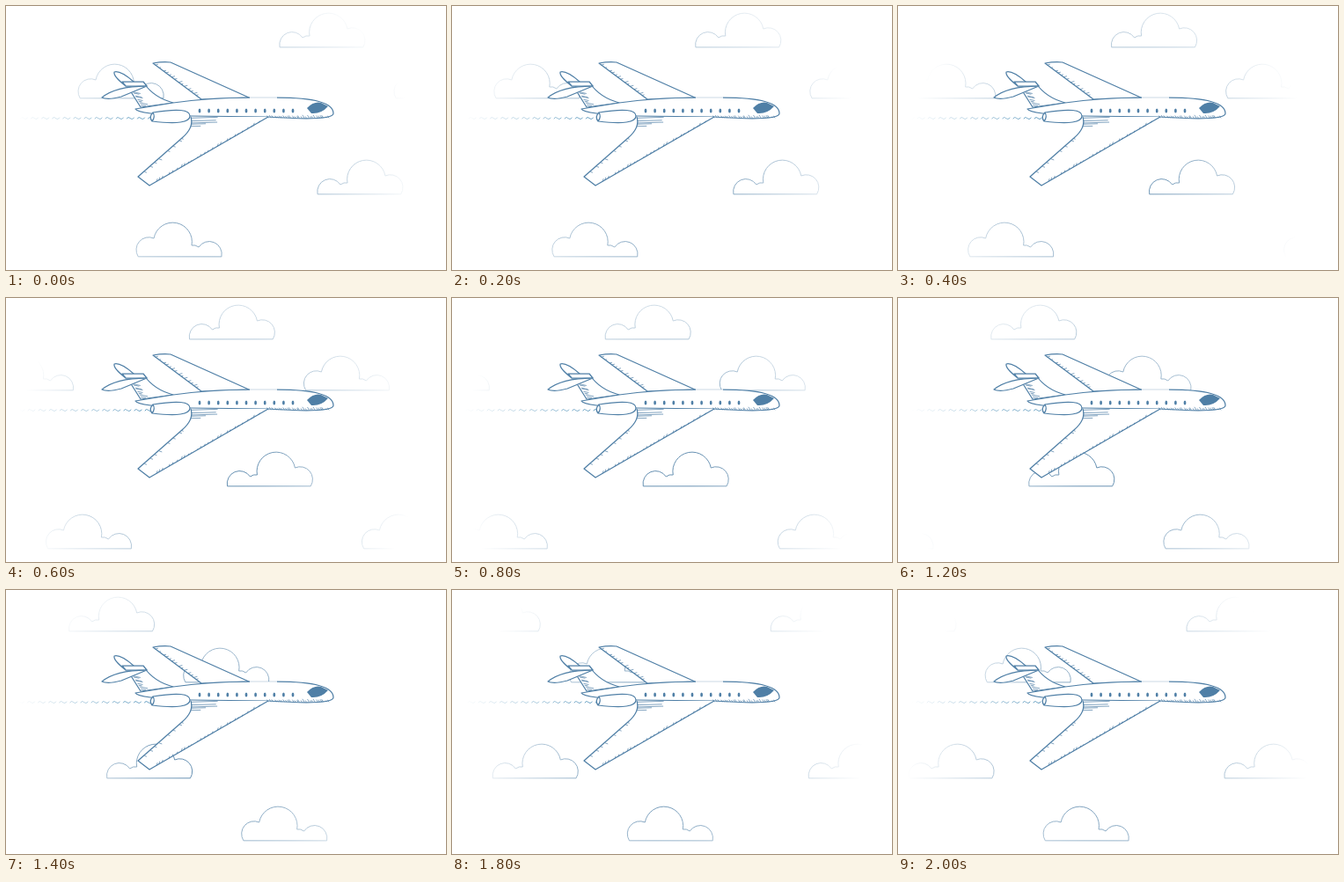
These frames come from a looping animation (500x300 px, 2.1 s). An HTML page:

```html
<!DOCTYPE html>
<html lang="en">
<head>
<meta charset="utf-8">
<title>Plane among clouds</title>
<style>
  html, body { margin: 0; width: 100%; height: 100%; overflow: hidden; background: #fff; }
  svg { display: block; width: 100vw; height: 100vh; }
  .line { fill: none; stroke: #4f7fa6; stroke-linecap: round; stroke-linejoin: round; }
  .solid { fill: #fff; stroke: #4f7fa6; stroke-width: 1.25; stroke-linejoin: round; }
  .ink { fill: #4f7fa6; }
</style>
</head>
<body>
<svg viewBox="0 0 500 300">
  <defs>
    <path id="cloud"/>
    <radialGradient id="haze" gradientUnits="userSpaceOnUse" cx="238" cy="181" r="229">
      <stop offset=".2" stop-color="#fff" stop-opacity=".1"/>
      <stop offset="1" stop-color="#fff"/>
    </radialGradient>
    <linearGradient id="trailFade" gradientUnits="userSpaceOnUse" x1="14" x2="165">
      <stop offset="0" stop-color="#6ba3c4" stop-opacity="0"/>
      <stop offset="1" stop-color="#5b98bd"/>
    </linearGradient>
  </defs>

  <g id="clouds" class="line" stroke-width=".95"></g>
  <rect width="500" height="300" fill="url(#haze)"/>
  <path id="trail" fill="none" stroke="url(#trailFade)" stroke-linecap="round"/>

  <g id="plane">
    <!-- far wing, fin, tailplane -->
    <path class="solid" d="M222 106L167 65Q178 63 187 64L276 104Z"/>
    <path class="solid" d="M153 115L141 96L157 88Q168 104 190 110Z"/>
    <path class="solid" d="M135 90Q122 80 123 75Q130 73 145 86Z"/>
    <path class="solid" d="M132 86H156L160 91H136Z"/>
    <path class="solid" d="M109 104Q124 91 160 91L131 103Q116 107 109 104Z"/>
    <!-- fuselage, left open along the highlight on its back -->
    <path class="solid" d="M277 104Q230 104 190 110L147 117Q150 123 210 125L298 126Q372 131 372 122Q372 104 308 104"/>
    <path class="line" stroke-width=".3" d="M277 104H308"/>
    <!-- near wing, engine, cockpit -->
    <path class="solid" d="M210 126Q214 138 200 150L150 194L163 204L298 126"/>
    <path class="solid" d="M167 121Q209 114 209 125Q209 136 166 131Q162 126 167 121Q170 126 166 131"/>
    <path class="ink" d="M342 116Q350 108 358 110L366 114Q358 123 347 122Z"/>
    <g id="windows" class="ink"></g>
    <path id="hatching" class="line" stroke-width=".7"/>
  </g>
</svg>
<script>
const LOOP = 2100, STEP = 100, SPAN = 359;
const CLOUD_WIDTH = 98.5, WAVE = 12.1, WAVES_PER_LOOP = 8;
const $ = id => document.getElementById(id);

function add(parent, tag, attrs) {
  const node = document.createElementNS("http://www.w3.org/2000/svg", tag);
  for (const name in attrs) node.setAttribute(name, attrs[name]);
  return parent.appendChild(node);
}

// Three bumps on a flat base; the two outer ones share a radius.
const bump = (radius, x, y) => `A${radius} ${radius} 0 0 1 ${x} ${y}`;
$("cloud").setAttribute("d",
  `M2 35.5${bump(14.3, 28, 25)}Q32 22 36 23${bump(21.5, 79, 15)}${bump(14.3, 97, 35.5)}Z`);

function addCloud(x, y, flip) {
  // A copy one span behind arrives as the first one leaves.
  return [x, x + SPAN].map(left => ({
    left, y, flip, node: add($("clouds"), "use", { href: "#cloud" })
  }));
}

const clouds = [
  addCloud(309, 11, false),
  addCloud(82.5, 69, true),
  addCloud(352, 178, false),
  addCloud(148.5, 249, true)
].flat();

for (let i = 0; i < 11; i++) {
  add($("windows"), "ellipse", { cx: 220 + i * 10.6, cy: 119, rx: 1.4, ry: 2.5 });
}

let seed = 11;
function random() {
  seed = (seed * 16807) % 2147483647;
  return seed / 2147483647;
}

// Short uneven strokes (dx, dy) set along the line from a to b.
function hatch([ax, ay], [bx, by], count, dx, dy) {
  let d = "";
  for (let i = 0; i < count; i++) {
    const k = (i + random() * 0.7) / count, size = 0.3 + random() * 0.7;
    d += `M${ax + (bx - ax) * k} ${ay + (by - ay) * k}l${dx * size} ${dy * size}`;
  }
  return d;
}

$("hatching").setAttribute("d",
  hatch([170, 67], [220, 104], 14, 4, -1) +
  hatch([144, 97], [154, 113], 8, 10, 2) +
  hatch([211, 127], [210, 138], 5, 34, -1) +
  hatch([168, 201], [290, 131], 26, 1, -3) +
  hatch([154, 192], [207, 145], 8, 3, 1) +
  hatch([298, 127], [368, 127], 28, -2, -3));

function render(time) {
  const progress = Math.floor((time % LOOP) / STEP) * STEP / LOOP;
  for (const { left, y, flip, node } of clouds) {
    const x = left - progress * SPAN;
    node.setAttribute("transform", flip
      ? `translate(${x + CLOUD_WIDTH} ${y}) scale(-1 1)`
      : `translate(${x} ${y})`);
  }
  const shift = (progress * WAVES_PER_LOOP % 1) * WAVE;
  let d = "";
  for (let x = 16.4 - shift; x < 166; x += WAVE) d += `M${x} 128c2 -5 5 4 8 -1`;
  $("trail").setAttribute("d", d);
}

const start = performance.now();
function tick() {
  render(performance.now() - start);
  requestAnimationFrame(tick);
}
tick();
</script>
</body>
</html>
```
